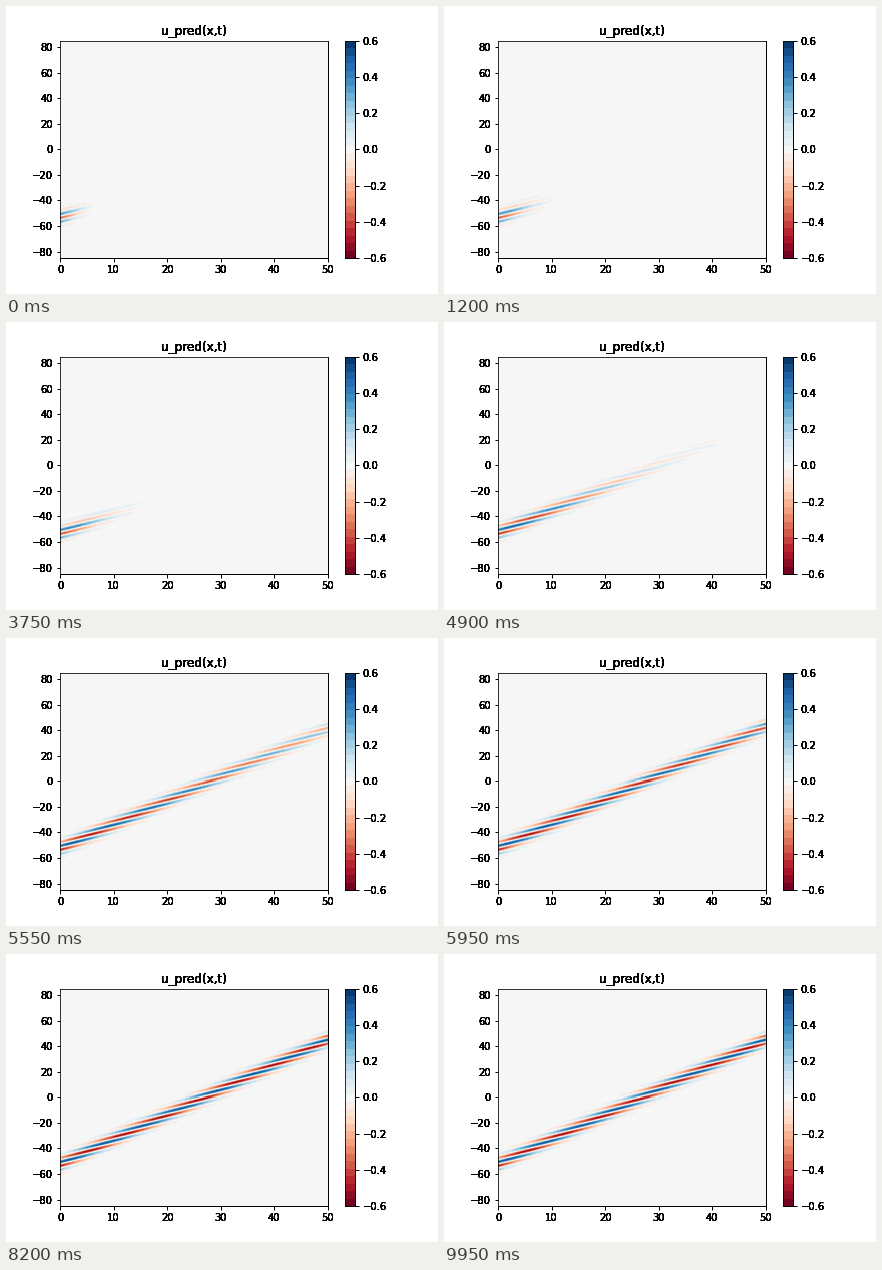
Animation, 432 px wide and 288 px high, one loop 10000 ms. Source, as a matplotlib script:

```python
import numpy as np
import matplotlib.pyplot as plt
from matplotlib.animation import FuncAnimation

W, H, DPI = 432, 288, 72
FRAMES, STEP = 200, 50
LEFT, BOTTOM, WIDTH, HEIGHT = 54, 36, 267.84, 217.44
BAR_LEFT, BAR_WIDTH = 338.58, 10.87
T_MAX, X_MAX, U_MAX = 50, 85, 0.6

plt.rcParams["font.family"] = "DejaVu Sans"
fig = plt.figure(figsize=(W / DPI, H / DPI), dpi=DPI, facecolor="white")

# Discrete red-blue palette with one neutral band around zero.
levels = np.linspace(-U_MAX, U_MAX, 30)
mids = (levels[1:] + levels[:-1]) / 2
cmap = plt.get_cmap("RdBu")
palette = cmap((mids + U_MAX) / (2 * U_MAX), bytes=True)[:, :3]

# One sample per pixel, so the bands keep hard edges.
COLS, ROWS = 268, 217
t = ((np.arange(COLS) + 0.5) / COLS * T_MAX)[None, :]
x = ((np.arange(ROWS) + 0.5) / ROWS * 2 - 1)[:, None] * X_MAX

# The packet travels about twice as fast as the ripples inside it.
X0, X_END, K, CYCLES = -52, 44.5, 0.96, 7
SPEED = (X_END - X0) / T_MAX
OMEGA = (K * (X_END - X0) - np.pi / 2 - 2 * np.pi * CYCLES) / T_MAX
noise = np.random.default_rng(4).normal(0, 0.02, FRAMES)


def mix(a, b, p):
    return a + (b - a) * p


def wave(i):
    """Network's solution: it learns the start first, then ever later times."""
    s = i * STEP / 1000
    learned = 1 / (1 + np.exp((4.7 - s) / 0.5))
    wobble = 1 + noise[i] * mix(1, 0.1, learned)
    reach = (5.5 - 2 * np.exp(-s / 0.3) + 17 * np.exp((s - 4.9) / 0.6)) * wobble
    amp = mix(0.4, 0.52, learned) * wobble
    center = X0 - mix(1.5, 0, learned) + mix(1.45, SPEED, learned) * t
    envelope = np.exp(-(t / reach) ** 1.8 - ((x - center) / 3.7) ** 2 / 2)
    ripple = np.sin(K * (x - X0) - OMEGA * t)
    return envelope * (amp * ripple + mix(0.05, 0, learned))


def picture(i):
    band = np.floor((wave(i) + U_MAX) / (levels[1] - levels[0])).astype(int)
    return palette[np.clip(band, 0, len(palette) - 1)]


def panel(left, width, ylim):
    ax = fig.add_axes([left / W, BOTTOM / H, width / W, HEIGHT / H])
    ax.set_ylim(*ylim)
    ax.tick_params(width=1, labelleft=False, labelbottom=False)
    for side, spine in ax.spines.items():
        spine.set_linewidth(0.8 if side in ("left", "top") else 1)
    return ax


def label(px, py, text, ha, va, size=10):
    # Stacked copies give the heavy, hard-edged lettering.
    for _ in range(9):
        fig.text(px / W, py / H, text, ha=ha, va=va, size=size, color="black")


def number(value, fmt):
    return format(value, fmt).replace("-", "\u2212")


def y_pixel(value, top):
    return BOTTOM + HEIGHT * (value + top) / (2 * top)


ax = panel(LEFT, WIDTH, (-X_MAX, X_MAX))
image = ax.imshow(picture(0), origin="lower", aspect="auto",
                  extent=(0, T_MAX, -X_MAX, X_MAX), interpolation="nearest")
x_ticks, y_ticks = range(0, 51, 10), range(-80, 81, 20)
ax.set_xticks(x_ticks)
ax.set_yticks(y_ticks)
for v in x_ticks:
    label(LEFT + WIDTH * v / T_MAX, BOTTOM - 7, str(v), "center", "top")
for v in y_ticks:
    label(LEFT - 7, y_pixel(v, X_MAX), number(v, "d"), "right", "center_baseline")
label(LEFT + WIDTH / 2, BOTTOM + HEIGHT + 6, "u_pred(x,t)", "center", "baseline", 12)

bar = panel(BAR_LEFT, BAR_WIDTH, (-U_MAX, U_MAX))
bar.pcolormesh([0, 1], levels, mids[:, None], cmap=cmap, vmin=-U_MAX, vmax=U_MAX)
bar.set_xticks([])
bar.yaxis.tick_right()
bar.tick_params(labelright=False)
bar_ticks = [n / 5 for n in range(-3, 4)]
bar.set_yticks(bar_ticks)
for v in bar_ticks:
    label(BAR_LEFT + BAR_WIDTH + 7, y_pixel(v, U_MAX), number(v, ".1f"),
          "left", "center_baseline")


def update(i):
    image.set_data(picture(i))
    return (image,)


anim = FuncAnimation(fig, update, frames=FRAMES, interval=STEP,
                     repeat=True, repeat_delay=0, blit=False)
plt.show()
```
